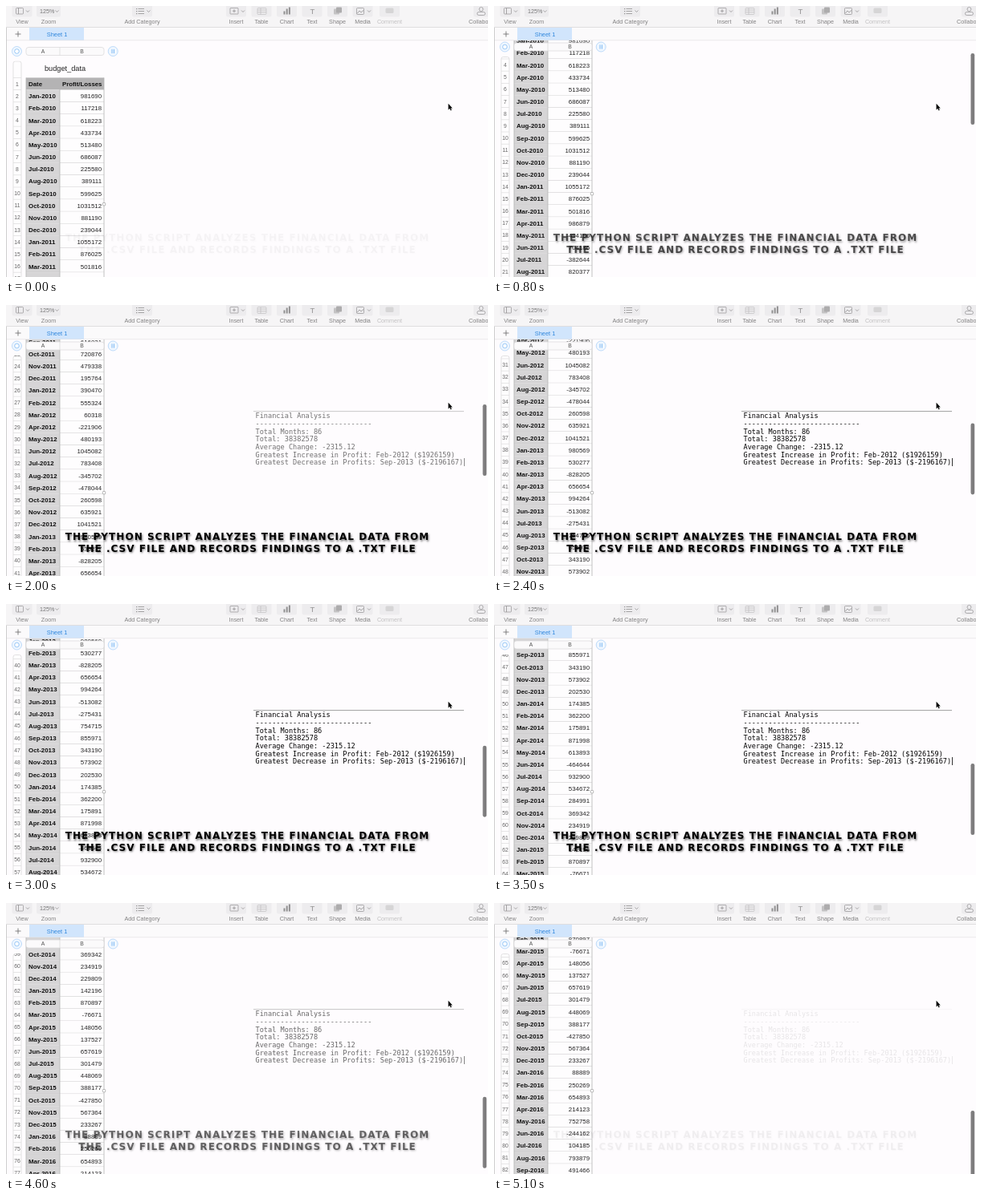
Write an HTML page with a canvas that moves like this. It is 600 by 338 pixels and loops after 5.2 s.

```html
<!DOCTYPE html>
<html>
<head>
<meta charset="utf-8">
<title>Budget data</title>
<style>
  html, body { margin: 0; width: 100%; height: 100%; overflow: hidden; background: #fefcfe; }
  canvas { display: block; width: 600px; height: 338px; }
</style>
</head>
<body>
<canvas id="stage"></canvas>
<script>
const LOOP = 5200, STEP = 100, PITCH = 15.17, FIRST_ROW = 97, CONTENT_TOP = 43, ROWS = 86;
const SANS = '"Liberation Sans", Arial, sans-serif';
const MONO = '"DejaVu Sans Mono", monospace';
const WIDE = '"DejaVu Sans", sans-serif';
const MONTHS = 'Jan Feb Mar Apr May Jun Jul Aug Sep Oct Nov Dec'.split(' ');
const REPORT = [
  'Financial Analysis', '-'.repeat(28), 'Total Months: 86', 'Total: 38382578', 'Average Change: -2315.12',
  'Greatest Increase in Profit: Feb-2012 ($1926159)', 'Greatest Decrease in Profits: Sep-2013 ($-2196167)'];
// time in ms, scroll offset in px
const SCROLL = [[200, 0], [800, 69], [1500, 233.4], [2400, 477.6], [3000, 612.6], [4000, 812.8], [5100, 993]];

const canvas = document.getElementById('stage');
const ctx = canvas.getContext('2d');
const ratio = window.devicePixelRatio || 1;
canvas.width = 600 * ratio;
canvas.height = 338 * ratio;

const clamp = (v, lo = 0, hi = 1) => Math.min(hi, Math.max(lo, v));
const ramp = (t, from, to) => clamp((t - from) / (to - from));

// seeded monthly results: mostly gains, about one loss in seven
const noise = seed => {
  const v = Math.sin(seed * 12.9898) * 43758.5453;
  return v - Math.floor(v);
};
const profit = i => {
  const amount = Math.round(60000 + 1000000 * noise(i));
  return noise(i + 500) < 0.14 ? -amount : amount;
};

function slope(i) {
  if (i === 0) return 0;
  const [t0, y0] = SCROLL[i - 1], [t1, y1] = SCROLL[Math.min(i + 1, SCROLL.length - 1)];
  return (y1 - y0) / (t1 - t0);
}

function scrollAt(t) {
  if (t <= SCROLL[0][0]) return 0;
  const i = Math.min(SCROLL.findLastIndex(p => p[0] <= t), SCROLL.length - 2);
  const [t0, y0] = SCROLL[i], [t1, y1] = SCROLL[i + 1];
  const d = t1 - t0, u = (t - t0) / d, v = 1 - u;
  return v * v * (1 + 2 * u) * y0 + u * u * (3 - 2 * u) * y1
    + d * u * v * (v * slope(i) - u * slope(i + 1));
}

function text(str, x, y, size, color, align = 'left', weight = '', family = SANS) {
  ctx.font = `${weight} ${size}px ${family}`;
  ctx.fillStyle = color;
  ctx.textAlign = align;
  ctx.fillText(str, x, y);
}

function rect(x, y, w, h, color) {
  ctx.fillStyle = color;
  ctx.fillRect(x, y, w, h);
}

function box(x, y, w, h, r, fill, stroke) {
  ctx.beginPath();
  ctx.roundRect(x, y, w, h, r);
  if (fill) { ctx.fillStyle = fill; ctx.fill(); }
  if (stroke) { ctx.strokeStyle = stroke; ctx.stroke(); }
}

function path(points, color, width = 0.8) {
  ctx.beginPath();
  points.forEach(([x, y]) => ctx.lineTo(x, y));
  ctx.strokeStyle = color;
  ctx.lineWidth = width;
  ctx.stroke();
  ctx.lineWidth = 0.7;
}

const chevron = (x, c) => path([[x - 2, 5.5], [x, 7.5], [x + 2, 5.5]], c);

function clipped(y, draw) {
  ctx.save();
  ctx.beginPath();
  ctx.rect(0, y, 600, 338 - y);
  ctx.clip();
  draw();
  ctx.restore();
}

function toolbar() {
  const ink = '#929192', pale = '#c2c1c2', label = '#838283', face = '#edecee';
  rect(0, 0, 600, 27, '#f6f5f6');
  rect(0, 26, 600, 0.8, '#dad9da');
  rect(0, 27, 600, 16, '#fbfafb');
  rect(29, 27, 68, 16, '#d1e5fc');
  rect(0, 42.5, 600, 0.7, '#e3e2e3');
  rect(0, 27, 0.8, 311, '#c4c4c4');
  path([[11.5, 35], [18.5, 35]], '#666');
  path([[15, 31.5], [15, 38.5]], '#666');
  text('Sheet 1', 63.5, 37.9, 7.4, '#2f86dc', 'center');

  const buttons = {
    View: 20, Zoom: 53, 'Add Category': 169.5, Insert: 286.5, Table: 318, Chart: 349.5,
    Text: 381, Shape: 412.5, Media: 444, Comment: 477.5, Collaborate: 594.5 };
  for (const [name, x] of Object.entries(buttons)) {
    box(x - 12.5, -4, 25, 17.5, 2.5, face);
    text(name, x, 22, 7.2, name === 'Comment' ? pale : label, 'center');
  }

  box(12.5, 2.5, 9, 7.5, 1, null, ink);
  path([[15.5, 2.5], [15.5, 10]], ink);
  box(38, -4, 30, 17.5, 2.5, face);
  text('125%', 42, 9, 7.2, '#777');
  for (const y of [3.5, 6.5, 9.5]) {
    rect(162, y - 0.5, 1.2, 1.2, ink);
    path([[164.5, y], [172, y]], ink);
  }
  box(279, 2.5, 10, 7.5, 0.5, null, ink);
  path([[282, 6.2], [286, 6.2]], ink);
  path([[284, 4.2], [284, 8.2]], ink);
  box(313, 2.5, 11, 8, 1, null, pale);
  path([[313, 5], [324, 5]], pale);
  path([[313, 7.8], [324, 7.8]], pale);
  path([[317, 2.5], [317, 10.5]], pale);
  [4, 7, 9].forEach((h, i) => rect(345.5 + i * 3.2, 10.5 - h, 2, h, ink));
  text('T', 381.5, 10, 9.5, ink, 'center');
  box(408, 3.5, 7, 7, 1, '#c4c3c4');
  box(411, 1.5, 7, 7, 1, '#adacad');
  box(436.5, 2.5, 9, 8, 1, null, ink);
  path([[437, 9.5], [440, 6], [442, 8], [445, 5.5]], ink);
  box(472.5, 2.5, 10, 6.5, 1.5, '#d6d5d6');
  box(589, 1.5, 5, 5, 2.5, null, ink);
  box(586.5, 7.5, 10, 4, 2, null, ink);
  for (const x of [27, 63.5, 177.5, 295, 452]) chevron(x, ink);
}

function table(scroll) {
  const top = FIRST_ROW - PITCH / 2 - scroll;
  const shift = Math.min(5.5, scroll);
  const letterY = 56.5 - shift;
  const first = Math.max(0, Math.floor((CONTENT_TOP - top) / PITCH));
  const last = Math.min(ROWS, Math.floor((338 - top) / PITCH));
  const eachRow = draw => { for (let i = first; i <= last; i++) draw(i, top + i * PITCH); };

  clipped(CONTENT_TOP, () => {
    text('budget_data', 73.5, 81.2 - scroll, 9.2, '#222', 'center');
    eachRow((i, y) => {
      const base = y + PITCH / 2 + 3;
      rect(25, y, 97, PITCH, i ? '#fefdfe' : '#b4b3b4');
      if (i) rect(25, y, 42, PITCH, '#d6d5d6');
      rect(25, y + PITCH - 0.4, 97, 0.8, '#c4c3c4');
      const date = i ? `${MONTHS[(i - 1) % 12]}-${2010 + Math.floor((i - 1) / 12)}` : 'Date';
      text(date, 28, base, 7.9, '#111', 'left', 'bold');
      if (i) text(profit(i), 119, base, 7.85, '#222', 'right');
      else text('Profit/Losses', 70, base, 7.8, '#111', 'left', 'bold');
    });
    const head = Math.max(CONTENT_TOP, top);
    for (const x of [24.6, 66.6, 121.6]) rect(x, head, 0.8, 338 - head, '#b5b4b5');
  });

  const stripTop = 69 - shift;
  clipped(stripTop - 0.5, () => {
    box(9, stripTop, 10, 300, 2.5, '#fefdfe', '#d6d5d6');
    eachRow((i, y) => {
      rect(9, y - 0.3, 10, 0.7, '#dddcdd');
      text(i + 1, 14, y + PITCH / 2 + 2.6, 6.8, '#666', 'center');
    });
  });

  box(25, letterY - 5, 97, 10, 3, '#fbfafb', '#d8d7d8');
  path([[67, letterY - 5], [67, letterY + 5]], '#d8d7d8', 0.7);
  text('A', 46, letterY + 2.4, 6.8, '#555', 'center');
  text('B', 94.5, letterY + 2.4, 6.8, '#555', 'center');
  for (const x of [13.5, 133.2]) box(x - 6, letterY - 6, 12, 12, 6, '#f0f7ff', '#a5cdf6');
  box(10.7, letterY - 2.8, 5.6, 5.6, 2.8, '#fff', '#6fb1f2');
  for (const x of [132, 134.4]) path([[x, letterY - 2.6], [x, letterY + 2.6]], '#5ca6f0');
  box(120.3, 245.5 - Math.min(13, scroll / 2), 3.4, 3.4, 0.8, '#fff', '#999');
}

function report(alpha) {
  ctx.globalAlpha = alpha;
  rect(308, 132.3, 262, 0.8, '#888');
  REPORT.forEach((line, i) => text(line, 310.5, 141.3 + i * 9.65, 8.6, '#000', 'left', '', MONO));
  rect(570, 191, 0.8, 10, '#000');
  ctx.globalAlpha = 1;
}

function caption(alpha) {
  ctx.save();
  ctx.globalAlpha = alpha;
  ctx.shadowColor = 'rgba(0,0,0,.55)';
  ctx.shadowBlur = 2.5 * ratio;
  ctx.shadowOffsetX = ratio;
  ctx.shadowOffsetY = 1.5 * ratio;
  ctx.letterSpacing = '1.04px';
  const line = (str, y) => text(str, 300.5, y, 12, '#000', 'center', 'bold', WIDE);
  line('THE PYTHON SCRIPT ANALYZES THE FINANCIAL DATA FROM', 293.4);
  line('THE .CSV FILE AND RECORDS FINDINGS TO A .TXT FILE', 307.9);
  ctx.restore();
}

function pointer() {
  const shape = new Path2D('M550.6 121.8v7.6l1.8-1.6 1.2 2.6 1.2-.6-1.2-2.4h2.2z');
  ctx.strokeStyle = '#fff';
  ctx.lineWidth = 0.8;
  ctx.stroke(shape);
  ctx.fillStyle = '#000';
  ctx.fill(shape);
}

function draw(t) {
  const scroll = scrollAt(t);
  ctx.setTransform(ratio, 0, 0, ratio, 0, 0);
  ctx.lineWidth = 0.7;
  rect(0, 0, 600, 338, '#fefcfe');
  toolbar();
  table(scroll);
  if (scroll > 0) box(593.5, 44 + scroll * 0.2165, 4.7, 89, 2.3, '#7e7d7e');
  report(Math.min(ramp(t, 1500, 2400), 1 - ramp(t, 4200, 5195)));
  caption(Math.min(ramp(t, -40, 1250), 1 - ramp(t, 4150, 5145)));
  pointer();
}

function tick(now) {
  draw(Math.floor(now % LOOP / STEP) * STEP);
  requestAnimationFrame(tick);
}
requestAnimationFrame(tick);
</script>
</body>
</html>
```
